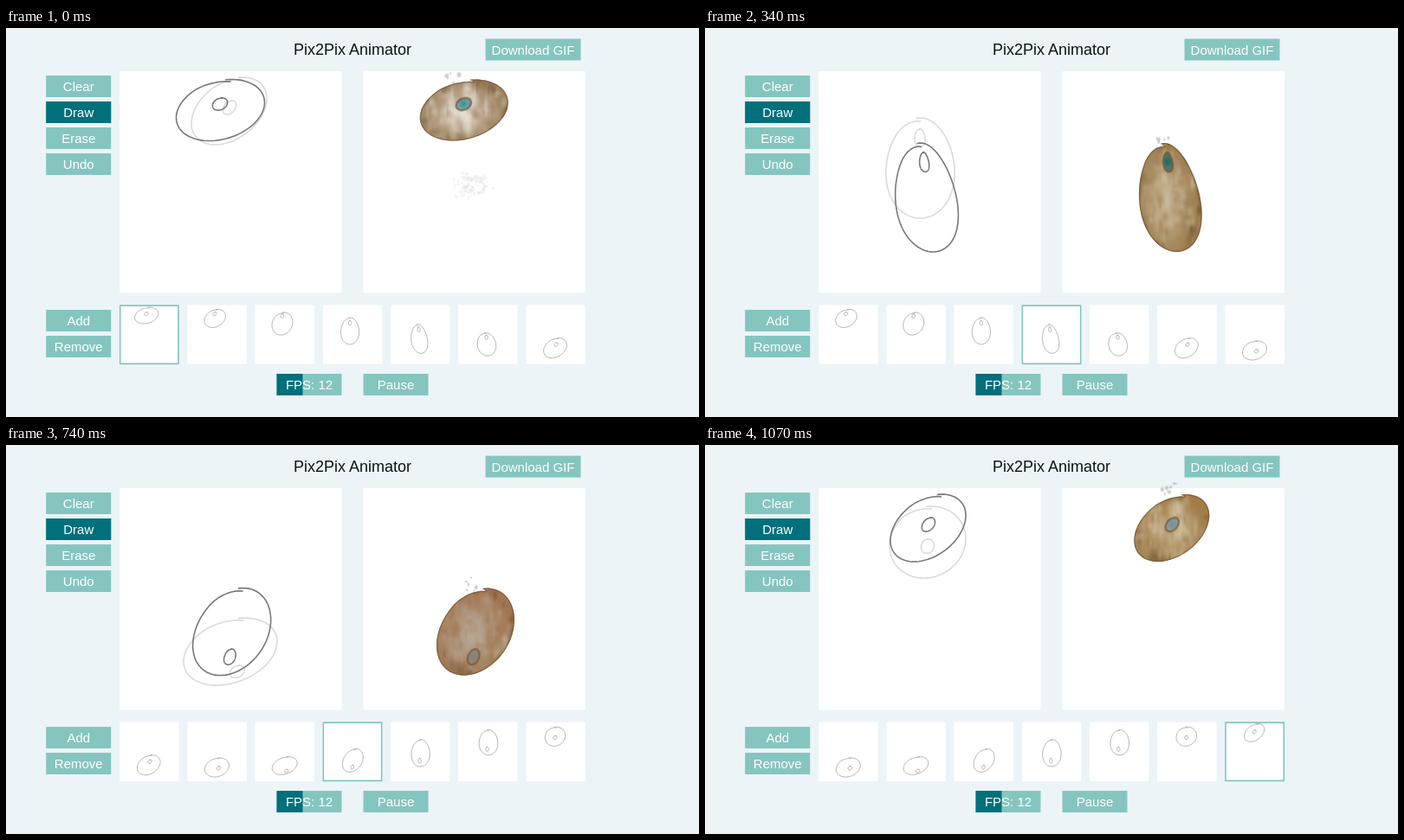
An HTML page with a canvas that plays this animation: 800 px wide and 450 px high, repeating every 1170 ms.

```html
<!DOCTYPE html>
<html lang="en">
<head>
<meta charset="utf-8">
<title>Animator</title>
<style>
  html, body { margin: 0; width: 100%; height: 100%; overflow: hidden; background: #ecf4f8; }
  canvas, svg { position: absolute; left: 0; top: 0; }
  text { font: 15px Arial, "Liberation Sans", sans-serif; text-anchor: middle; fill: #fff; }
  .title { font-size: 18px; fill: #111; }
</style>
</head>
<body>
<canvas id="stage" width="800" height="450"></canvas>
<svg id="ui" width="800" height="450"><text class="title" x="400" y="31">Pix2Pix Animator</text></svg>
<script>
const teal = '#85c5bf', dark = '#00707b', rim = '#6a4e30';
const left = 131.25, top0 = 50, size = 256.25, shift = 281.25;
const thumb = 68.3, pitch = 78.2, thumbTop = 320.6, slots = 7;
const ends = [70, 170, 240, 340, 400, 500, 570, 670, 740, 840, 900, 1000, 1070, 1170];
const g = document.getElementById('stage').getContext('2d');
const ui = document.getElementById('ui');

// filled: width of the dark part
function button(label, x, y, width = 75, filled = 0) {
  ui.innerHTML += `<rect x="${x}" y="${y}" width="${width}" height="25" fill="${teal}"/>
    <rect x="${x}" y="${y}" width="${filled}" height="25" fill="${dark}"/>
    <text x="${x + width / 2}" y="${y + 18}">${label}</text>`;
}
['Clear', 'Draw', 'Erase', 'Undo'].forEach((label, i) => button(label, 46.25, 55 + 30 * i, 75, label === 'Draw' ? 75 : 0));
['Add', 'Remove'].forEach((label, i) => button(label, 46.25, 326 + 30 * i));
button('Download GIF', 553.5, 12.5, 110);
button('FPS: 12', 312.5, 400, 75, 30);
button('Pause', 412.5, 400);

// One hand-drawn loop: a leaning ellipse, the narrower at the top the taller it is,
// whose pen starts a little inside and overshoots its start.
function loop(x, y, w, h, lean) {
  const path = new Path2D(), egg = .2 * Math.max(0, h / w - 1);
  for (let u = 0; u <= 1.03; u += .01) {
    const a = -Math.PI / 2 - u * 2 * Math.PI;
    const grow = 1 - .07 * Math.max(0, 1 - 8 * u);
    path.lineTo(x + grow * w * Math.cos(a + lean) * (1 + egg * Math.sin(a)), y + grow * h * Math.sin(a));
  }
  return path;
}

// body centre and half size, lean, eye centre, then rim, inner and eye colours
function pose(x, y, w, h, lean, ex, ey, base, light, iris) {
  const round = Math.sqrt(w / h);
  return {
    x, y, w, h, ex, ey, base, light, iris,
    body: loop(x, y, w, h, lean),
    eye: loop(ex, ey, 7.2 * round, 8.6 / round, lean)
  };
}

const poses = [
  pose(247.5, 95, 51, 35.5, .25, 247, 88, '#a08462', '#ebe5dc', '#3a8f98'),
  pose(250.5, 107.5, 46, 39.5, .25, 249, 88, '#a58250', '#e2d9c8', '#556b68'),
  pose(249, 130.5, 45, 49, .15, 248.5, 97.5, '#a97a38', '#d8cfbb', '#775c3c'),
  pose(248.5, 162, 39.5, 58, 0, 248, 127, '#a5824c', '#d0c0a0', '#4e6657'),
  pose(255, 196, 36, 63, -.2, 253, 155, '#9c7d4f', '#ccbc9f', '#1d665f'),
  pose(253.5, 220, 40.5, 50, -.1, 253, 189, '#a08055', '#c1b5a1', '#456f7d'),
  pose(257, 236, 50, 43.5, .3, 261.5, 221, '#98754a', '#c3beb4', '#4e8fbd'),
  pose(259, 246.5, 52.5, 41.5, .2, 266.5, 249.5, '#9a784f', '#bdb6aa', '#617c89'),
  pose(259, 239, 54, 39, .3, 267, 262, '#9c764e', '#bab0a3', '#77777a'),
  pose(261, 216, 45, 50.5, .3, 258.5, 245, '#a07650', '#b9aa99', '#858078'),
  pose(261, 184, 40, 59, .03, 257, 217, '#b48b5a', '#d3c0a6', '#80664d'),
  pose(261.5, 138, 40.5, 55, 0, 256, 167, '#c0925a', '#ead8bf', '#926d43'),
  pose(257, 112.5, 44, 41.5, .1, 257, 117, '#b08a56', '#dfcfae', '#71705f'),
  pose(257.5, 96, 43.5, 39, .38, 258, 92, '#a07d4a', '#d6c7aa', '#728f9c')
];

let seed;
const rnd = () => (seed = seed * 16807 % 2147483647) / 2147483647;
const spread = r => (rnd() + rnd() + rnd() - 1.5) * r;

function sketch(p, color, width) {
  g.strokeStyle = color;
  g.lineWidth = width;
  g.stroke(p.body);
  g.stroke(p.eye);
}

function soft(x, y, rx, ry, color, alpha) {
  g.save();
  g.translate(x, y);
  g.scale(rx, ry);
  const fade = g.createRadialGradient(0, 0, 0, 0, 0, 1);
  fade.addColorStop(0, color + alpha);
  fade.addColorStop(1, color + '00');
  g.fillStyle = fade;
  g.fillRect(-1, -1, 2, 2);
  g.restore();
}

function dust(x, y, r, count, color) {
  for (let n = 0; n < count; n++) soft(x + spread(r), y + spread(r * .7), 1 + 3 * rnd(), 1 + 3 * rnd(), color, '90');
}

// furry patch: light inside, browner toward the rim
function paint(p, i) {
  seed = 991 + i * 7919;
  dust(p.x - 8, p.y - p.h - 4, 12, 6, '#888888');
  if (i < 3) dust(256, 181 + 25 * i, 20, 70, '#dddddd');
  g.save();
  g.clip(p.body);
  g.fillStyle = p.base;
  g.fillRect(left, top0, size, size);
  soft(p.x - 4, p.y + 4, p.w * 1.05, p.h * 1.05, p.light, 'ff');
  for (let n = 0; n < 150; n++) {
    const a = rnd() * 7, r = Math.sqrt(rnd());
    const color = r > .92 ? rim : rnd() < .4 + .4 * r ? p.base : p.light;
    soft(p.x + p.w * r * Math.cos(a), p.y + p.h * r * Math.sin(a), 2 + rnd() * 7, 4 + rnd() * 11, color, '60');
  }
  g.strokeStyle = rim + '90';
  g.lineWidth = 2.5;
  g.stroke(p.body);
  g.fillStyle = p.iris + 'a0';
  g.fill(p.eye);
  g.strokeStyle = rim + '90';
  g.stroke(p.eye);
  soft(p.ex, p.ey, 6, 7, p.iris, 'ff');
  g.restore();
}

function render(i) {
  const first = Math.max(0, Math.min(poses.length - slots, i - 3)), k = thumb / size;
  g.clearRect(0, 0, 800, 450);
  g.lineCap = g.lineJoin = 'round';
  g.fillStyle = '#fff';
  g.fillRect(left, top0, size, size);
  g.fillRect(left + shift, top0, size, size);
  sketch(poses[(i + poses.length - 1) % poses.length], '#dadada', 1.6);
  sketch(poses[i], '#787878', 1.6);

  g.save();
  g.translate(shift, 0);
  paint(poses[i], i);
  g.restore();

  for (let s = 0; s < slots; s++) {
    g.save();
    g.translate(left + s * pitch, thumbTop);
    g.fillStyle = '#fff';
    g.fillRect(0, 0, thumb, thumb);
    if (first + s === i) {
      g.strokeStyle = teal;
      g.strokeRect(.5, .5, thumb - 1, thumb - 1);
    }
    g.scale(k, k);
    g.translate(-left, -top0);
    sketch(poses[first + s], '#888', .65 / k);
    g.restore();
  }
}

let shown = -1;
function tick() {
  const t = performance.now() % 1170;
  const i = ends.findIndex(end => t < end);
  if (i !== shown) render(shown = i);
  requestAnimationFrame(tick);
}
tick();
</script>
</body>
</html>
```
